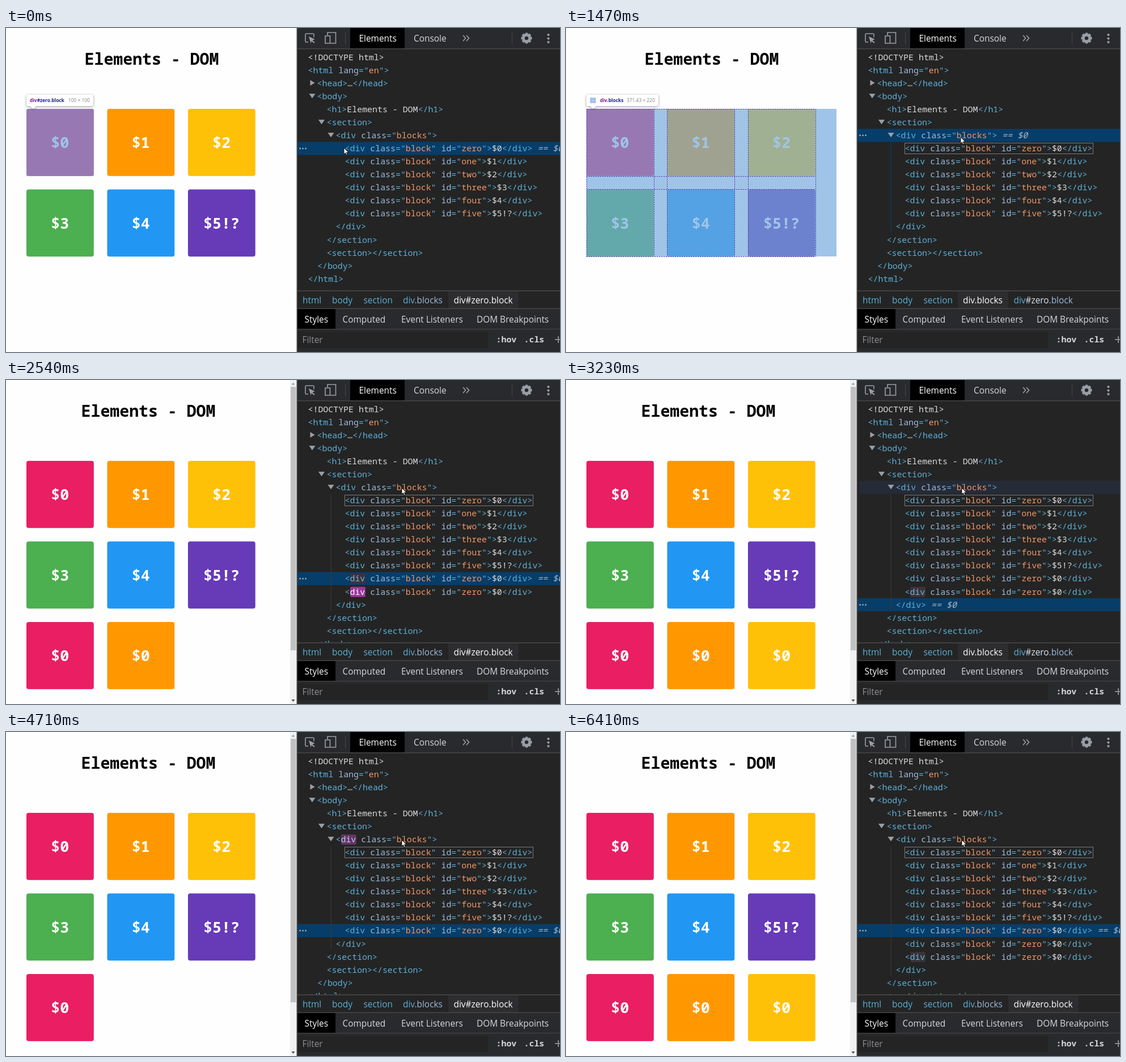
An HTML page for the animation above (6.56 s loop, 977 by 573 pixels).

```html
<!DOCTYPE html>
<html lang="en">
<head>
<meta charset="utf-8">
<title>Elements - DOM</title>
<style>
html, body { margin: 0; width: 100%; height: 100%; overflow: hidden; background: #fefefe; }
svg { display: block; }
text { white-space: pre; font: 15.4px "Open Sans", sans-serif; }
.code { font: 500 14.91px "Noto Sans Mono", monospace; fill: #5db0d7; }
.page { font: bold 26.7px "Noto Sans Mono", monospace; text-anchor: middle; fill: #fff; }
.tip { font-size: 8.4px; }
.tip-box { filter: drop-shadow(0 1px 2px rgba(0, 0, 0, .4)); }
</style>
</head>
<body>
<svg id="stage" width="977" height="573" viewBox="0 0 977 573"></svg>
<script>
const LOOP = 6560, ADV = 8.946, ROW = 23.06, BLOCKS = 6;
const BLUE = '#5db0d7', PALE = '#9bbbdc', ORANGE = '#f29766', LIGHT = '#d9dada', GREY = '#9aa0a6';
const COLORS = ['#e91e63', '#ff9800', '#ffc107', '#4caf50', '#2196f3', '#673ab7'];
const IDS = ['zero', 'one', 'two', 'three', 'four', 'five'];
const LABELS = ['$0', '$1', '$2', '$3', '$4', '$5!?'];

// start, extra blocks on the page, extra rows in the tree, selected row, overlay (1 block, 2 grid), hovered row
const STATES = [
  [0, 0, 0, 7, 1, 0], [1000, 0, 0, 7, 2, 1], [1410, 0, 0, 6, 2, 0],
  [1770, 1, 0, 13, 0, 1], [1850, 1, 1, 12, 0, 0], [2160, 1, 1, 6, 2, 0],
  [2470, 2, 1, 14, 0, 1], [2540, 2, 2, 13, 0, 0], [2850, 2, 2, 6, 2, 0],
  [3160, 3, 2, 15, 0, 1], [3310, 3, 3, 14, 0, 0], [3860, 2, 2, 14, 0, 0],
  [4480, 1, 1, 13, 0, 0], [4790, 2, 2, 13, 0, 0], [5640, 3, 3, 13, 0, 0]
];
const FLASHES = [[13, 1850], [14, 2540], [15, 3310], [6, 3860], [6, 4480], [14, 4790], [15, 5640]];
const CLICKS = [[1410, 60], [2160, 240], [2850, 240]];
const CURSOR = [[70, 596, 212], [690, 673, 212], [750, 673, 211], [920, 673, 211], [1150, 696, 193],
  [1770, 696, 193], [1850, 698, 191]];

const rect = (x, y, w, h, fill, more = '') =>
  `<rect x="${x}" y="${y}" width="${w}" height="${h}" fill="${fill}" ${more}/>`;
const path = (d, fill, more = '') => `<path d="${d}" fill="${fill}" ${more}/>`;
const line = (d, color, width = 1, more = '') => path(d, 'none', `stroke="${color}" stroke-width="${width}" ${more}`);
const circle = (x, y, r, fill) => `<circle cx="${x}" cy="${y}" r="${r}" fill="${fill}"/>`;
const text = (x, y, s, fill, cls = '', more = '') =>
  `<text x="${x}" y="${y}" class="${cls}" ${fill ? `fill="${fill}"` : ''} ${more}>${s}</text>`;
const span = (fill, s, more = '') => `<tspan fill="${fill}" ${more}>${s}</tspan>`;
const mix = (a, b, k) => `rgb(${a.map((v, i) => Math.round(v + (b[i] - v) * k))})`;
const mid = row => 51.5 + row * ROW;

// cubic-bezier(0, 0, .2, 1)
function easeOut(x) {
  let lo = 0, hi = 1;
  for (let i = 0; i < 16; i++) {
    const s = (lo + hi) / 2;
    if (.6 * s * s * (1 - s) + s ** 3 < x) lo = s; else hi = s;
  }
  return 3 * lo * lo * (1 - lo) + lo ** 3;
}

function flashAt(row, t) {
  const hit = FLASHES.filter(f => f[0] === row && f[1] <= t).pop();
  const age = hit ? t - hit[1] : 1400;
  if (age >= 1400) return null;
  const k = easeOut(Math.min(1, age / 1120));
  return {
    fill: mix([158, 54, 153], [51, 51, 51], k),
    ink: mix([255, 255, 255], [93, 176, 215], k),
    alpha: Math.min(1, (1400 - age) / 280)
  };
}

function cursorAt(t) {
  const next = CURSOR.findIndex(p => p[0] > t);
  if (next === 0) return CURSOR[0].slice(1);
  if (next < 0) return CURSOR[CURSOR.length - 1].slice(1);
  const a = CURSOR[next - 1], b = CURSOR[next], u = (t - a[0]) / (b[0] - a[0]), k = u * u * (3 - 2 * u);
  return [a[1] + (b[1] - a[1]) * k, a[2] + (b[2] - a[2]) * k];
}

function open(name, attrs = {}, ink = BLUE) {
  const list = Object.entries(attrs).map(([k, v]) => ` ${span(PALE, k)}="${span(ORANGE, v)}"`).join('');
  return `&lt;${span(ink, name)}${list}&gt;`;
}
const close = name => `&lt;/${name}&gt;`;

function tooltip(grid, size) {
  const w = grid ? 127 : 118, x = grid ? 60 : 42;
  let s = path(`M38 118h${w - 4}q2 0 2 2v16q0 2-2 2H54l-6 5-6-5h-4q-2 0-2-2v-16q0-2 2-2z`, '#fff', 'class="tip-box"');
  if (grid) for (const p of [[43.5, 124], [48.5, 124], [43.5, 129], [48.5, 129]])
    s += rect(...p, 3, 3, 'none', 'stroke="#4a86e0"');
  s += text(x, 131.3, span('#881280', 'div') + span('#1a1aa6', grid ? '.blocks' : '#zero.block'), '', 'tip', 'style="font-weight:700"');
  return s + text(grid ? 107 : 110, 131.3, size, '#808080', 'tip');
}

function page(extra, overlay, scroll) {
  let s = rect(0, 0, 513, 573, '#fefefe');
  s += text(scroll ? 251 : 257, 64.5, 'Elements - DOM', '', 'page', 'style="font-size:28.2px;fill:#000"');
  for (let i = 0; i < 6 + extra; i++) {
    const x = 36 + i % 3 * 142.45, y = 143 + Math.floor(i / 3) * 142.45;
    s += rect(x, y, 118.8, 118.8, COLORS[i % 6], 'rx="4"');
    s += text(x + 59.2, y + 69.3, LABELS[i] || '$0', '', 'page');
  }
  const tint = 'rgba(111,168,220,.66)';
  if (overlay === 1) s += rect(36, 143, 118.8, 118.8, tint) + tooltip(false, '100 × 100');
  if (overlay === 2) {
    const rows = scroll ? 3 : 2, bottom = scroll ? 546.5 : 404;
    s += rect(36, 143, scroll ? 429.5 : 441, bottom - 143, tint);
    let d = '';
    for (let i = 0; i < 3; i++) for (const o of [0, 119]) {
      const at = Math.round(i * 142.45 + o);
      d += `M${36.5 + at} 143V${bottom}`;
      if (i < rows) d += `M36 ${143.5 + at}H440.5`;
    }
    s += line(d, '#5230a4', 1, 'stroke-dasharray="2.4 1.6" stroke-opacity=".9"');
    s += tooltip(true, scroll ? '361.71 × 340' : '371.43 × 220');
  }
  if (scroll) s += rect(501, 0, 12, 573, '#f1f1f1') + rect(502, 12, 9.5, 466, '#c1c1c1') +
    path('M503.5 8.5l3-4 3 4z', '#a3a3a3') + path('M503.5 565l3 4 3-4z', '#505050');
  return s;
}

function tree(t, extra, sel, hover) {
  const ids = IDS.concat(Array(extra).fill('zero'));
  const rows = [
    [533, span(LIGHT, '&lt;!DOCTYPE html&gt;')],
    [533, open('html', { lang: 'en' })],
    [549, open('head') + span(LIGHT, '…') + close('head')],
    [549, open('body')],
    [566, open('h1') + span(LIGHT, 'Elements - DOM') + close('h1')],
    [566, open('section')],
    [582, ink => open('div', { class: 'blocks' }, ink)],
    ...ids.map((id, i) => [598, ink => open('div', { class: 'block', id }, ink) +
      span(LIGHT, LABELS[i] || '$0') + close('div')]),
    [582, close('div')],
    [566, close('section')],
    [566, open('section') + close('section')],
    [549.5, close('body')],
    [533, close('html')]
  ];
  let s = '';
  if (hover) s += rect(518, mid(BLOCKS) - ROW / 2, 459, ROW, '#262b38');
  s += rect(514, mid(sel) - ROW / 2, 463, ROW, '#073d69');
  if (t >= 1000) s += rect(572.5, 202, 1, mid(7 + ids.length) - 191, sel === BLOCKS ? '#0b4270' : '#3a3a3a');
  for (const x of [518.5, 523.5, 528.5]) s += circle(x, mid(sel), 1.5, GREY);
  rows.forEach(([x, body], i) => {
    const y = mid(i), live = typeof body === 'function', flash = flashAt(i, t);
    if (flash && live) s += rect(x + ADV, y - 8.5, 3 * ADV, 18, flash.fill, `rx="2" opacity="${flash.alpha}"`);
    const markup = live ? body(flash ? flash.ink : BLUE) : body;
    const mark = i === sel ? span('#aab8c4', ' == $0', 'style="font-style:italic"') : '';
    s += text(x - .5, y + 5.2, markup + mark, '', 'code');
  });
  s += path('M536.5 92l8 5-8 5z', GREY);
  for (const [x, i] of [[540, 3], [556.5, 5], [573, BLOCKS]]) s += path(`M${x - 5.5} ${mid(i) - 4.5}h11l-5.5 8z`, GREY);
  if (t >= 70) s += rect(597.5, 203.5, 332, 19, 'none', 'stroke="#d0d0d0" stroke-dasharray="1 1"');
  return `<g clip-path="url(#tree)">${s}</g>`;
}

function crumbs(t, active) {
  const id = t >= 1850 && t < 2540 ? 'five' : 'zero';
  let s = active ? rect(691, 466, 89, 30, '#2d2d2f') : rect(780, 466, 124, 30, '#2d2d2f');
  s += text(523, 487, 'html', BLUE) + text(575, 487, 'body', BLUE) + text(630.5, 487, 'section', BLUE);
  s += text(700, 487, active ? 'div.blocks' : 'div' + span(PALE, '.blocks'), active ? '#fff' : BLUE);
  return s + text(789.5, 487, active ? `div${span('#d6e6f5', '#' + id)}${span(PALE, '.block')}` : `div#${id}.block`, active ? BLUE : '#fff');
}

function toolbar() {
  let s = rect(513, 0, 464, 36, '#292a2d') + rect(513, 36, 464, 1.5, '#474747') + rect(607, 0, 96, 36, '#000');
  s += line('M533 25h-3q-2 0-2-2V12q0-2 2-2h11q2 0 2 2v4', GREY, 1.6) + path('M534 15l11 5-4.5 1.5 4 4-1.5 1.5-4-4-1.5 4z', GREY);
  s += line('M567 13V8h14.5v19h-9M563 14h8.5v13H563z', GREY, 1.6);
  s += rect(598, 8, 1, 20, '#47484a') + rect(892, 8, 1, 20, '#47484a');
  s += text(622.5, 24, 'Elements', '#fff') + text(719, 24, 'Console', LIGHT);
  s += line('M806 13l4.5 5-4.5 5M812 13l4.5 5-4.5 5', GREY, 1.6);
  for (let a = 0; a < 180; a += 45) s += rect(915.5, 8.5, 5, 19, GREY, `rx="1" transform="rotate(${a} 918 18)"`);
  s += circle(918, 18, 7.5, GREY) + circle(918, 18, 3.3, '#292a2d');
  for (const y of [12, 18.5, 25]) s += circle(956.5, y, 2.1, GREY);
  return s;
}

function panes() {
  let s = rect(513, 464, 464, 1.5, '#4a4a4a') + rect(513, 495.5, 464, 1.5, '#474747');
  s += rect(513, 497, 464, 35, '#292a2d') + rect(514, 497, 67, 35, '#000') + rect(513, 532, 464, 1.5, '#474747');
  s += rect(513, 533, 464, 40, '#292a2d') + rect(514, 537, 336, 29, '#242424');
  s += text(526.5, 521, 'Styles', '#fff') + text(593.5, 521, 'Computed', LIGHT);
  s += text(697, 521, 'Event Listeners', LIGHT) + text(830, 521, 'DOM Breakpoints', LIGHT);
  s += text(522.5, 557, 'Filter', '#8b8e92');
  for (const [x, label] of [[864.5, ':hov'], [913.5, '.cls']])
    s += text(x, 556, label, '', 'code', 'style="font-weight:700;fill:#d5d6d6"');
  return s + line('M968 551h12M974 545v12', GREY, 1.6);
}

const FIXED = toolbar(), PANES = panes();

function pointer(t) {
  const [x, y] = cursorAt(t);
  let s = '';
  for (const [start, length] of CLICKS) {
    const k = (t - start) / length;
    if (k >= 0 && k < 1) s += circle(697, 189.5, 7 + 2 * k, `rgba(200,170,50,${.75 * (1 - k * k)})`);
  }
  return s + path('M0 0V11L2.5 8.7 4.2 12.5 6 11.7 4.3 8H8z', '#fff',
    `stroke="#000" stroke-width=".8" transform="translate(${x.toFixed(1)} ${y.toFixed(1)})"`);
}

function draw(t) {
  const [, blocks, rows, sel, overlay, hover] = STATES.filter(s => s[0] <= t).pop();
  const parent = sel === BLOCKS || sel === 13 + rows;
  return '<clipPath id="tree"><path d="M513 37h464v427H513z"/></clipPath>' +
    page(blocks, overlay, t >= 1770) + rect(513, 0, 464, 573, '#242424') + tree(t, rows, sel, hover) +
    FIXED + crumbs(t, parent) + PANES + rect(512.5, 0, 1.5, 573, '#4c4c4c') + pointer(t);
}

const stage = document.getElementById('stage');
let last = '';
function tick() {
  const next = draw(performance.now() % LOOP);
  if (next !== last) stage.innerHTML = last = next;
  requestAnimationFrame(tick);
}
tick();
</script>
</body>
</html>
```
